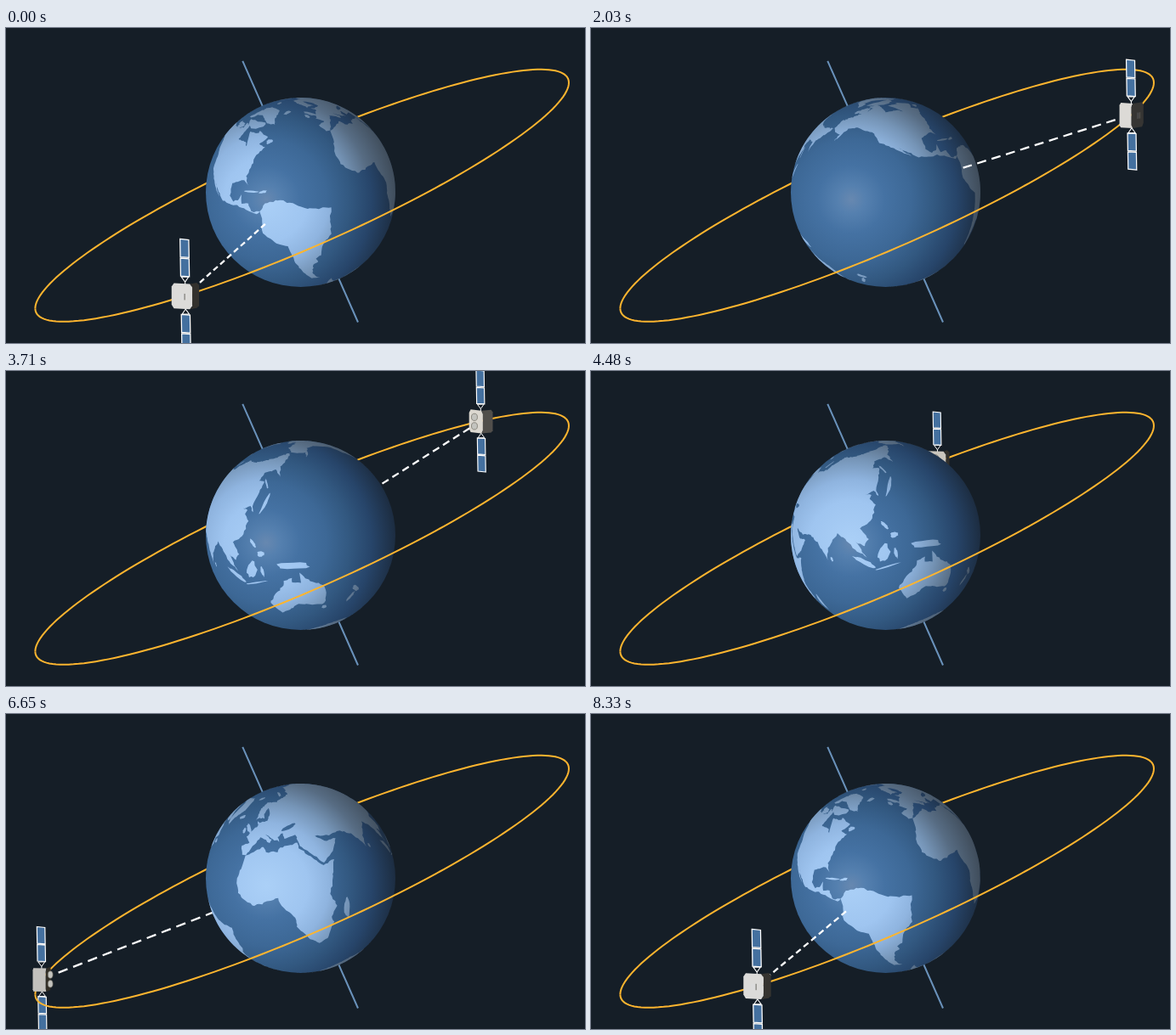
Animation, 681 px wide and 371 px high, one loop 8.4 s. Source, as an HTML page:

```html
<!DOCTYPE html>
<html lang="en">
<head>
<meta charset="utf-8">
<title>Geostationary orbit</title>
<style>
html, body { margin: 0; width: 100%; height: 100%; overflow: hidden; background: #151e27; }
svg { display: block; width: 100%; height: 100%; }
.orbit { fill: none; stroke: #fdb52f; stroke-width: 2; }
.panel { fill: #44709f; stroke: #fff; stroke-width: 1.2; }
.yoke { fill: #151e27; stroke: #fff; stroke-width: 1; }
.dish { fill: #c4c4bf; stroke: #6b685e; stroke-width: .7; }
</style>
</head>
<body>
<svg viewBox="0 0 681 371">
  <defs>
    <radialGradient id="ocean" gradientUnits="userSpaceOnUse" cx="306" cy="202" r="165">
      <stop offset="0" stop-color="#6788b0"/>
      <stop offset=".1" stop-color="#5580af"/>
      <stop offset=".24" stop-color="#4572a3"/>
      <stop offset=".43" stop-color="#3d6896"/>
      <stop offset=".6" stop-color="#325880"/>
      <stop offset=".75" stop-color="#27456a"/>
      <stop offset=".93" stop-color="#1c2c40"/>
    </radialGradient>
    <radialGradient id="land" gradientUnits="userSpaceOnUse" cx="306" cy="202" r="165">
      <stop offset="0" stop-color="#abd0f7"/>
      <stop offset=".3" stop-color="#9fc5f0"/>
      <stop offset=".45" stop-color="#8fb4df"/>
      <stop offset=".6" stop-color="#7594b6"/>
      <stop offset=".75" stop-color="#576c83"/>
      <stop offset=".93" stop-color="#3f4c5a"/>
    </radialGradient>
  </defs>
  <path d="M278.3 38.8L414 346.5" stroke="#6a92bb" stroke-width="2"/>
  <path id="backArc" class="orbit"/>
  <g id="craft">
    <path id="beam" fill="none" stroke="#fff" stroke-width="2.3"/>
    <g id="sat">
      <g id="wings" transform="rotate(-1)"></g>
      <g id="body"></g>
    </g>
  </g>
  <g id="globe">
    <circle cx="346.5" cy="193.5" r="111.5" fill="url(#ocean)"/>
    <path id="lands" fill="url(#land)"/>
    <path id="lake" fill="url(#ocean)"/>
  </g>
  <path id="frontArc" class="orbit"/>
</svg>
<script>
const LOOP = 8400, STEP = 70, RAD = Math.PI / 180;
const CX = 346.5, CY = 193.5, EARTH = 111.5, ORBIT = 341, DEPTH = 0.068;
const ROLL = 23.75 * RAD, PITCH = 10.25 * RAD;
const { sin, cos, hypot } = Math;
const el = id => document.getElementById(id);
const fmt = points => points.map(p => p[0].toFixed(2) + ' ' + p[1].toFixed(2)).join('L');

// Rough coastlines: longitude, latitude pairs
const northAmerica = [-168,66,-156,71,-128,70,-96,68,-94,72,-82,69,-87,64.5,-94.5,59,-82,55,-80,51.5,-78,62.4,
  -66,58.6,-64,60,-56,52.5,-66,50,-61,46,-70,43,-76,36,-81,31.5,-80.3,25.5,-83,29.5,-94,29.6,-97.5,22.5,-95,18.5,
  -91,18.5,-87,21.4,-88.5,16,-83.3,15,-83,10,-77.3,8.4,-80,7.3,-87.6,13,-94,16.2,-105.5,20.2,-114,31.5,-109.5,23,
  -117,32.8,-124.3,40.3,-123.5,48,-135,58.5,-146,60.8,-154,58.3,-164.5,54.8,-157.5,58.7,-165,62];
const southAmerica = [-77.3,8.4,-72,12,-62,10.6,-50,.5,-44,-2.6,-35,-6,-39,-14,-41,-22,-48.5,-26.5,-53.5,-34,-58,-35,
  -57.8,-38.2,-62.2,-39,-67.5,-46,-68.3,-52.5,-66,-55,-73.5,-52.5,-73.5,-37.2,-70.3,-18.4,-76.2,-14,-81.2,-5,-77.5,3.8];
const africa = [-6,35.8,10,37.3,11,33.5,19,30.5,22,32.8,34.5,31.2,33.5,27.5,37.2,21,43,11.5,51,11.8,44,1,39.3,-6,
  40.7,-15,35,-20,35.5,-24,27,-33.6,20,-34.8,15,-27,11.8,-17,13.6,-11,9,-1,9,4.3,-8,4.4,-13,9,-17,14.7,-16,22,-9.7,30];
const eurasia = [-9,37,-9.4,43,-1.6,43.4,-4.7,48.4,8.5,53.8,8.2,57,10.6,55,19,54.4,24,59.3,25,65,17.2,61,16.5,57,
  11,59.2,6,58.5,14,67.5,28,71,40,67,44,68,67,69,72.5,72.8,104,77.5,128,73,160,69.7,190,66.2,179,62.5,163.5,59,157,51,
  157,58,143,59.2,135.5,54.7,141,52,130.5,42.5,127.5,39.5,126.5,34.5,125,39,117.8,39,122,37,119.5,35,121.8,30,
  116,23,106,20,109,12,105,9,100.5,13.4,103.5,2,98.5,9,94.5,17,90,22,80.2,15,77.5,8,72.8,20,66.5,25.2,57,26,48,30,
  52,24.5,59.8,22.5,53,16.5,44,12.8,35,28.5,36,36.5,27.3,37,28,41,23,40,22.8,36.5,13.5,45.5,18,40,15.6,38.2,9,44.4,
  -.3,39.4,-5.6,36];
const australia = [142.5,-10.8,146.2,-18.8,153,-25.2,153,-30,150,-37.3,146.4,-39,138,-35,131.2,-31.5,124,-33,
  115.1,-34.2,113.5,-24,122.2,-18.2,129.5,-14.9,131,-12.2,136.8,-12.2,135.5,-15,140.5,-17.5];
const greenland = [-72,78,-60,82,-33,83.5,-18,80,-22,71,-40,65,-44,60,-52,64,-57,75];
const antarctica = [-195,-77.5,-140,-75,-75,-73,-57,-63.5,-61,-74,-35,-77,-12,-71,50,-67,70,-69,100,-66,145,-67,171,-72];

// Islands: longitude, latitude, half length, half width, tilt
const islands = [
  [-72,68,9,3,-40], [-110,71,4,2.5,0], [-121,73,2,1.5,0], [-78,80,5,2.3,30], [-56,48.7,2,1.6,0],
  [-79.5,21.5,5.3,.6,-18], [-71,18.9,2.6,.8,-5], [-18.7,65,2.4,1.4,0], [-2.5,54,4,1.3,110], [-8,53.3,1.8,1.2,80],
  [60,74,4,.8,60], [17,78.8,2,1.3,0], [46.8,-19,6.8,2,72], [80.7,7.8,1.6,.8,95], [138,37.8,7.5,1,48],
  [142.8,50,4,.6,90], [121.5,16,3,1,110], [124.5,8.5,2.4,1.7,0], [101,-.2,7.5,1.5,-46], [113,-7.8,8,.5,-6],
  [114,.8,5.4,3.4,45], [121,-2,3.3,1.1,80], [141,-5.3,10,2.2,-22], [170.3,-43.7,4,1.2,42], [175.8,-38.8,3,1.5,-60],
  [146.7,-42,1.5,1.5,0]];
const blackSea = [34,43.2,4.6,1.5,0];

const noise = n => { const s = sin(n * 127.1 + 11.7) * 43758.5453; return (s - Math.floor(s)) * 2 - 1; };
const place = (lon, lat) => ({ lon, up: sin(lat * RAD), flat: cos(lat * RAD) });

// Split long edges and roughen them a little
function coast(flat) {
  const out = [];
  for (let i = 0; i < flat.length; i += 2) {
    const [lon, lat, lon2 = lon, lat2 = lat] = flat.slice(i, i + 4);
    const parts = Math.max(1, Math.ceil(hypot(lon2 - lon, lat2 - lat) / 2));
    for (let k = 0; k < parts; k++) {
      const n = out.length, rough = k ? 0.55 : 0;
      out.push(place(lon + (lon2 - lon) * k / parts + noise(n) * rough,
        lat + (lat2 - lat) * k / parts + noise(n + 0.5) * rough));
    }
  }
  return out;
}

function island([lon, lat, length, width, tilt]) {
  return Array.from({ length: 16 }, (_, i) => {
    const a = -i / 16 * 360 * RAD, k = 1 + 0.2 * noise(i + lon);
    const x = length * k * cos(a), y = width * k * sin(a), t = tilt * RAD;
    return place(lon + (x * cos(t) - y * sin(t)) / cos(lat * RAD), lat + x * sin(t) + y * cos(t));
  });
}

const landRings = [
  ...[northAmerica, southAmerica, africa, eurasia, australia, greenland, antarctica].map(coast),
  ...islands.map(island)];
const lakeRing = island(blackSea);

// u runs along the equator, v down the tilted axis
const toScreen = (u, v) => [CX + u * cos(ROLL) + v * sin(ROLL), CY - u * sin(ROLL) + v * cos(ROLL)];

const nearness = a => 1 / (1 - DEPTH * cos(a));
function orbitPoint(a) {
  const r = ORBIT * nearness(a);
  return toScreen(r * sin(a), r * cos(a) * sin(PITCH));
}

function arc(from) {
  return 'M' + fmt(Array.from({ length: 91 }, (_, i) => orbitPoint((from + i * 2) * RAD)));
}

// Points behind the globe slide out to its rim
function ringPath(ring, centre) {
  let visible = false;
  const points = ring.map(p => {
    const a = (p.lon - centre) * RAD;
    let x = p.flat * sin(a);
    const z = p.flat * cos(a);
    let y = z * sin(PITCH) - p.up * cos(PITCH);
    if (p.up * sin(PITCH) + z * cos(PITCH) > 0) visible = true;
    else { const d = hypot(x, y); x /= d; y /= d; }
    return toScreen(EARTH * x, EARTH * y);
  });
  return visible ? 'M' + fmt(points) + 'Z' : '';
}

function grey(nx, warm = 0) {
  const g = Math.round(Math.min(220, Math.max(50, 165 - 130 * nx)));
  return `rgb(${g},${g - warm},${g - warm * 3})`;
}

// An extruded octagon whose inner face always looks at the globe
function bodyMarkup(a) {
  const s = sin(a), c = cos(a), outer = c > 0;
  const at = (r, t, h) => [r * s + t * c, h + (r * c - t * s) * 0.1];
  const poly = (points, fill) => `<path d="M${fmt(points)}Z" fill="${fill}"/>`;
  const r = outer ? 8 : -8, side = s > 0 ? -1 : 1, sideFill = grey(c * side, 2);
  const face = [[-13, -10], [-10, -14], [10, -14], [13, -10], [13, 10], [10, 14], [-10, 14], [-13, 10]];
  const rim = [[-8, -12], [8, -12], [8, 12], [-8, 12]].map(([q, h]) => at(q, 13 * side, h));
  const cap = h => poly([at(-8, 10 * side, h), at(8, 10 * side, h),
    at(8, 13 * side, h * .8), at(-8, 13 * side, h * .8)], sideFill);
  const dishes = [-5.5, 5.5].map(h => {
    const [x, y] = at(-10.5, 0, h);
    return `<ellipse class="dish" cx="${x}" cy="${y}" rx="${2.6 + 1.6 * Math.abs(c)}" ry="4.3"/>`;
  }).join('');
  const box = poly(rim, sideFill) + cap(-14) + cap(14) +
    poly(face.map(([t, h]) => at(r, t, h)), grey(outer ? s : -s, outer ? 1 : 4));
  if (!outer) return box + dishes;
  const hatch = poly([at(9, -3, -3), at(9, 4, -3), at(9, 4, 4), at(9, -3, 4)], grey(s - .12));
  return dishes + box + hatch + `<path d="M${fmt([at(9, 4, -3), at(9, 4, 4)])}" stroke="#55534c" stroke-width=".8"/>`;
}

const wing = `<path class="panel" d="M-4.8-62.8L4.8-61.6V-42L-4.8-42.8ZM-4.8-41.4L4.8-40.6V-20.8L-4.8-21.6Z"/>
  <path class="yoke" d="M-4-20.6H4L0-15ZM0-15V-12"/>`;
el('wings').innerHTML = wing + `<g transform="rotate(180)">${wing}</g>`;
el('backArc').setAttribute('d', arc(90));
el('frontArc').setAttribute('d', arc(-90));

function draw(time) {
  const turn = 360 * (Math.floor(time / STEP) * STEP % LOOP) / LOOP;
  const a = (turn - 28.5) * RAD, centre = -48.5 - turn;
  el('lands').setAttribute('d', landRings.map(ring => ringPath(ring, centre)).join(''));
  el('lake').setAttribute('d', ringPath(lakeRing, centre));

  const [x, y] = orbitPoint(a);
  const [gx, gy] = toScreen(EARTH * sin(a), EARTH * cos(a) * sin(PITCH));
  const start = [x + (gx - x) * 0.096, y + (gy - y) * 0.096];
  const pitch = hypot(gx - start[0], gy - start[1]) / 10.6;
  el('beam').setAttribute('d', 'M' + fmt([start, [gx, gy]]));
  el('beam').setAttribute('stroke-dasharray', `${pitch * 0.62} ${pitch * 0.38}`);
  el('sat').setAttribute('transform', `translate(${x} ${y}) scale(${nearness(a)})`);
  el('body').innerHTML = bodyMarkup(a);

  const craft = el('craft');
  craft.parentNode.insertBefore(craft, cos(a) > 0 ? null : el('globe'));
}

let began;
function tick(now) {
  began ??= now;
  draw(now - began);
  requestAnimationFrame(tick);
}
draw(0);
requestAnimationFrame(tick);
</script>
</body>
</html>
```
